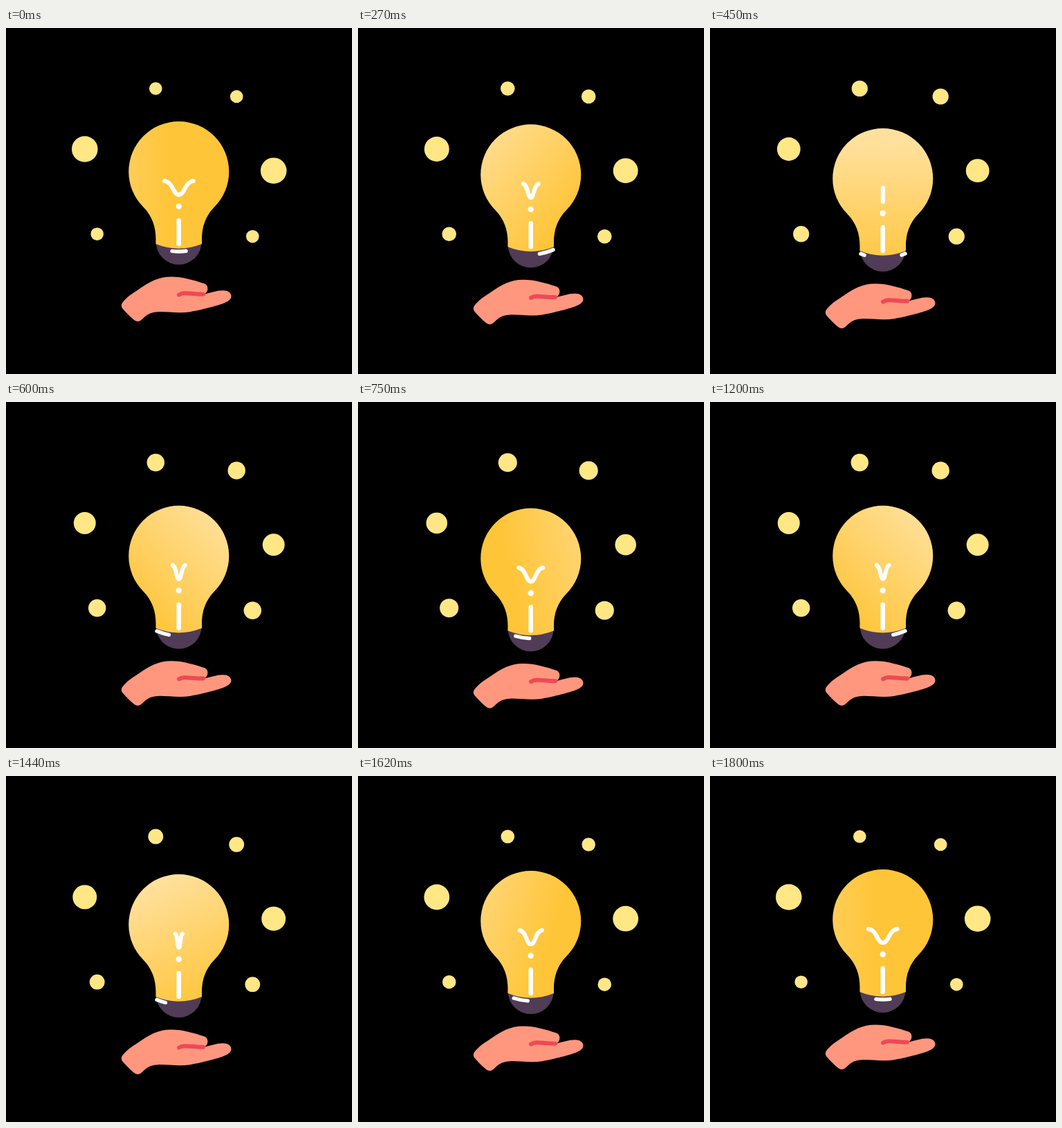
An HTML page that plays this animation: 500 px wide and 500 px high, repeating every 1.86 s.

```html
<!DOCTYPE html>
<html lang="en">
<head>
<meta charset="utf-8">
<title>Glowing idea</title>
<style>
  html, body { margin: 0; width: 100%; height: 100%; overflow: hidden; background: #000; }
  svg { display: block; width: 100%; height: 100%; }
</style>
</head>
<body>
<svg viewBox="0 0 500 500">
  <defs>
    <linearGradient id="glow" gradientUnits="userSpaceOnUse">
      <stop stop-color="#ffc538"/>
      <stop offset="1" stop-color="#ffe09c"/>
    </linearGradient>
  </defs>
  <g id="dots" fill="#ffe786"></g>
  <g id="float" fill="none" stroke-linecap="round" stroke-linejoin="round">
    <path fill="#ff977e" d="M167.5 398C174 389 182 384 192 377.5C207 367 220 359.5 239 359.5C255 359.5 272 364.5 287 369.5C292 371.5 292.5 378 290 381.5L287.500 384.500C296 382.500 304 379.500 313 379.300C320 379 325.500 382.500 325.500 387.500C325.500 392.500 320 395.500 314 398C304 402 276 408.500 266 410.200C251 412.500 235 410 222 410C206 410.500 203 415.500 196 421.500C192.500 425 188 424.500 184 421C179 417 174 411.500 168.500 405.500C166.500 403 166.500 400.500 167.500 398Z"/>
    <path stroke="#ee4955" stroke-width="6" d="M250 385.500C258 381 266 384.700 285 384.700"/>
    <path fill="#503c56" d="M216.700 309A33 33 0 0 0 282.700 309Z"/>
    <path fill="url(#glow)" d="M198.500 258.800A72.500 72.500 0 1 1 301 258.800C288 272 283 288 283 305V312Q249.700 325.500 216.500 312V305C216.500 288 211.500 272 198.500 258.800Z"/>
    <g stroke="#fff">
      <path id="fork" stroke-width="6"/>
      <path stroke-width="6.500" d="M249.700 278V312"/>
      <path id="shine" stroke-width="5.400"/>
    </g>
    <circle cx="249.700" cy="257.700" r="4.200" fill="#fff"/>
  </g>
</svg>
<script>
const LOOP = 1860, HALF = 900, MID = 249.8;
const $ = id => document.getElementById(id);
const set = (el, attrs) => { for (const k in attrs) el.setAttribute(k, attrs[k]); };

// x, y, radius when the bulb is up, radius when it is down
const dots = [
  [216.3, 87.5, 9.3, 13.9], [333.2, 99, 9.3, 13.9],
  [131.7, 297.7, 9.3, 13.9], [356.3, 301.2, 9.3, 13.9],
  [113.8, 175, 18.8, 15], [386.7, 206.2, 18.8, 15]
].map(([cx, cy, up, down]) => {
  const el = document.createElementNS('http://www.w3.org/2000/svg', 'circle');
  set(el, { cx, cy });
  $('dots').append(el);
  return { el, up, down };
});

// A piece of the shallow arc across the socket, cut off at its ends
function arc(from, to) {
  const a = Math.max(from, 218) - MID, b = Math.min(to, 282) - MID;
  if (b <= a) return '';
  const y = (u, v) => 323 - 0.0067 * u * v;
  return `M${MID + a} ${y(a, a)}Q${MID + (a + b) / 2} ${y(a, b)} ${MID + b} ${y(b, b)}`;
}

function draw(time) {
  const t = Math.min(time % LOOP, 2 * HALF);
  const x = t <= HALF ? t / HALF : 2 - t / HALF;
  const e = x * x * (3 - 2 * x);

  set($('float'), { transform: `translate(0 ${20 * e})` });
  for (const { el, up, down } of dots) set(el, { r: up + (down - up) * e });

  // The light swings from the left over the top to the right
  const angle = Math.PI * e, nx = -Math.cos(angle), ny = -Math.sin(angle);
  const near = 12 - 145 * Math.sin(angle) - 14 * e, far = near + 190;
  set($('glow'), {
    x1: MID + nx * near, y1: 207.5 + ny * near,
    x2: MID + nx * far, y2: 207.5 + ny * far
  });

  const w = 21 * Math.abs(1 - 2 * e) ** 1.15;
  const px = k => MID + k * w;
  set($('fork'), {
    d: `M${px(-1)} 221C${px(-.4)} 222.500 ${px(-.4)} 241 ${MID} 241` +
       `C${px(.4)} 241 ${px(.4)} 222.500 ${px(1)} 221`
  });

  const span = 74, start = 240 + span * (t / HALF % 1);
  set($('shine'), { d: arc(start, start + 20) + arc(start - span, start - span + 20) });
}

function tick() {
  draw(performance.now());
  requestAnimationFrame(tick);
}
tick();
</script>
</body>
</html>
```
